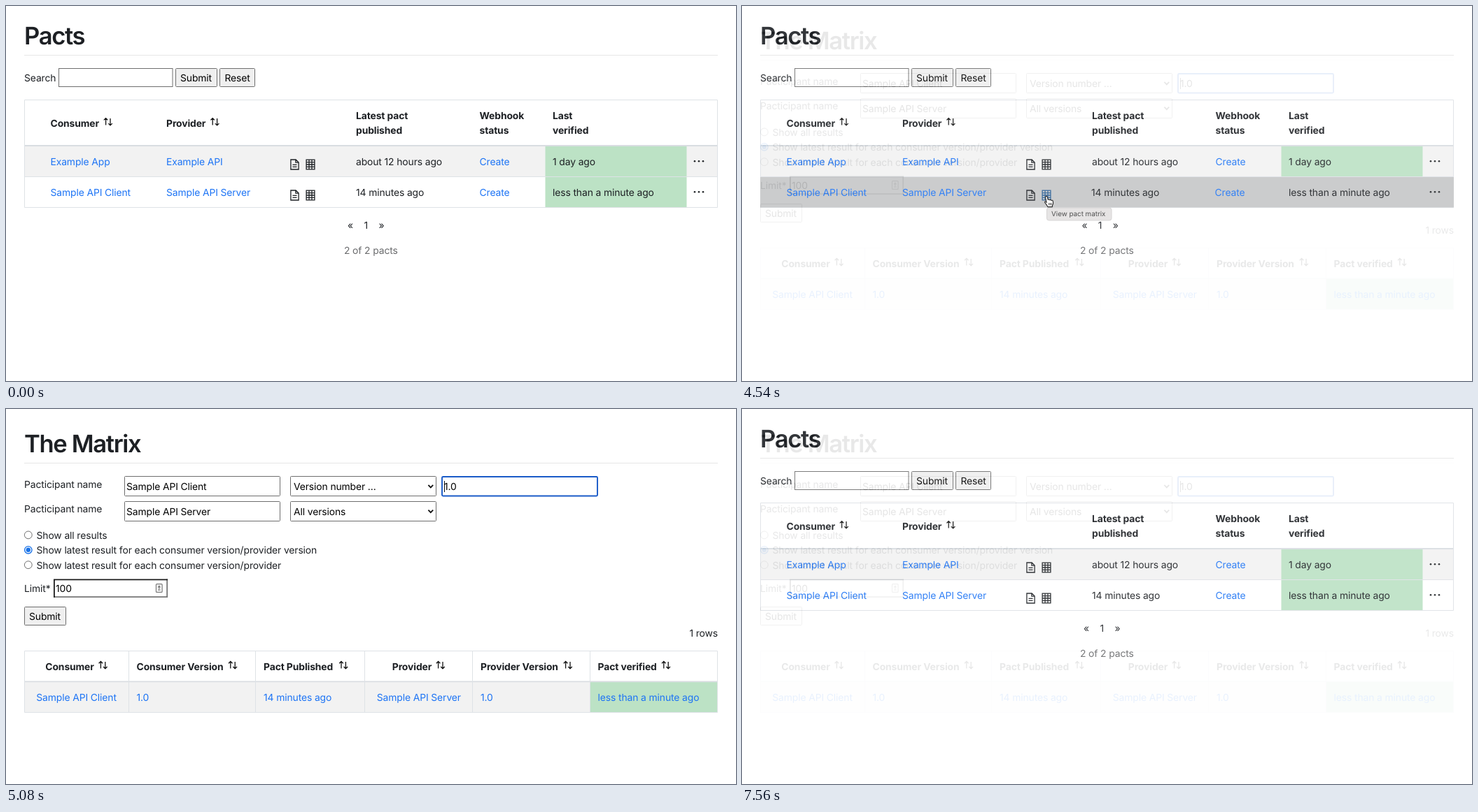
An HTML page that plays this animation: 1043 px wide and 537 px high, repeating every 7620 ms.

```html
<!DOCTYPE html>
<html lang="en">
<head>
<meta charset="utf-8">
<title>Pacts</title>
<style>
  html, body { margin: 0; width: 100%; height: 100%; overflow: hidden; background: #fff; }
  svg { display: block; width: 100vw; height: 100vh; }
  text {
    font: 400 13.9px Inter, "Liberation Sans", sans-serif;
    letter-spacing: -.12px;
    fill: #1d2024;
    text-rendering: geometricPrecision;
    white-space: pre;
  }
  .title { font-size: 34.6px; font-weight: 600; letter-spacing: -1.35px; }
  .th text { font-weight: 700; }
  .mid { text-anchor: middle; }
  .end { text-anchor: end; }
  .muted { fill: #6a6b6d; }
  .ctl text { fill: #000; }
  .link, .link text { fill: #1d74f5; }
  .tip { font-size: 9.8px; letter-spacing: 0; fill: #3c3c3c; }
  .line { fill: none; stroke: #dee2e6; }
  .rule { stroke: #e6e6e6; }
  .thick { stroke: #d9dde1; stroke-width: 1.8; }
  .box { fill: #fff; stroke: #6e6e6e; }
  .btn { fill: #efefef; stroke: #6e6e6e; }
  .ok { fill: #bce2c5; }
  .stripe { fill: #f2f2f2; }
  .ink { fill: none; stroke: #1d2024; stroke-width: 1.3; }
  .hot { stroke: #2a5f95; }

  /* cross-fades: ten hard steps of 60 ms */
  .hover, .matrix { opacity: 0; animation: 7620ms -8ms infinite; }
  .hover { animation-name: hover; }
  .matrix { animation-name: matrix; }
  @keyframes hover {
    0% { opacity: 0; animation-timing-function: step-end; }
    26.2467% { opacity: 0; animation-timing-function: steps(10, start); }
    34.1207% { opacity: 1; animation-timing-function: step-end; }
    70% { opacity: 0; animation-timing-function: step-end; }
    100% { opacity: 0; }
  }
  @keyframes matrix {
    0% { opacity: 0; animation-timing-function: step-end; }
    59.5801% { opacity: 0; animation-timing-function: steps(10, start); }
    67.4541% { opacity: 1; animation-timing-function: step-end; }
    92.9134% { opacity: 1; animation-timing-function: steps(9, start); }
    100% { opacity: .1; }
  }
</style>
</head>
<body>
<svg viewBox="0 0 1043 537" xmlns="http://www.w3.org/2000/svg">
  <defs>
    <path id="sort" fill="none" stroke="#111" stroke-width="1.3"
      d="M-3.2 5V-5M-6-2.2L-3.2-5L-.4-2.2M3.2-4.5V5.3M.4 2.5L3.2 5.3L6 2.5"/>
    <path id="file" class="ink"
      d="M-5.6-7H1.6L5.6-3V7H-5.6ZM1.4-7V-2.8H5.6M-3 .4H3M-3 3.4H3"/>
    <path id="grid"
      d="M-5.9-6.9H5.9V6.9H-5.9ZM-2-6.9V6.9M2-6.9V6.9M-5.9-3.4H5.9M-5.9 0H5.9M-5.9 3.4H5.9"/>
    <g id="dots" fill="#1d2024">
      <circle cx="-6" r="1.3"/><circle r="1.3"/><circle cx="6" r="1.3"/>
    </g>
    <path id="chevron" fill="none" stroke="#111" stroke-width="1.8" d="M-3.4-1.8L0 1.8L3.4-1.8"/>
    <circle id="radio" class="box" r="5.4"/>
  </defs>

  <g class="pacts">
    <rect width="1043" height="537" fill="#fff"/>
    <text class="title" x="26" y="55">Pacts</text>
    <path class="rule" d="M26 70.5H1017"/>
    <text x="26" y="108">Search</text>
    <g class="ctl">
      <rect class="box" x="75.5" y="89.5" width="162.5" height="26"/>
      <rect class="btn" x="242.5" y="89.5" width="59" height="26" rx="1"/>
      <text x="249" y="108">Submit</text>
      <rect class="btn" x="305.5" y="89.5" width="50" height="26" rx="1"/>
      <text x="312.5" y="108">Reset</text>
    </g>

    <rect class="stripe" x="26.5" y="200" width="990" height="44.5"/>
    <rect class="ok" x="770.5" y="200.5" width="202" height="88"/>
    <path class="line thick" d="M26.5 200H1016.5"/>
    <path class="line" d="M26.5 244.5H1016.5M26.5 134.5H1016.5V288.5H26.5Z"/>

    <g class="th">
      <text x="63.5" y="172.5">Consumer</text>
      <text x="229" y="172.5">Provider</text>
      <text x="500" y="161.8">Latest pact</text>
      <text x="500" y="183.2">published</text>
      <text x="676.5" y="161.8">Webhook</text>
      <text x="676.5" y="183.2">status</text>
      <text x="781" y="161.8">Last</text>
      <text x="781" y="183.2">verified</text>
    </g>
    <use href="#sort" x="145.8" y="165.6"/>
    <use href="#sort" x="298.4" y="165.6"/>

    <g class="link">
      <text x="63.5" y="228">Example App</text>
      <text x="229" y="228">Example API</text>
      <text x="676.5" y="228">Create</text>
      <text x="63.5" y="271.7">Sample API Client</text>
      <text x="229" y="271.7">Sample API Server</text>
      <text x="676.5" y="271.7">Create</text>
    </g>
    <text x="500" y="228">about 12 hours ago</text>
    <text x="781" y="228">1 day ago</text>
    <text x="500" y="271.7">14 minutes ago</text>
    <text x="781" y="271.7">less than a minute ago</text>
    <use href="#file" x="412.5" y="227"/>
    <use href="#grid" class="ink" x="435" y="227"/>
    <use href="#dots" x="990" y="222.3"/>
    <use href="#file" x="412.5" y="271"/>
    <use href="#grid" class="ink" x="435" y="271"/>
    <use href="#dots" x="990" y="266.2"/>

    <g class="mid">
      <text x="492" y="319">«</text>
      <text x="514.3" y="319">1</text>
      <text x="536.5" y="319">»</text>
      <text class="muted" x="521.3" y="354.6">2 of 2 pacts</text>
    </g>
  </g>

  <g class="hover">
    <rect x="480" y="300" width="66" height="28" fill="#fff"/>
    <rect x="26" y="245" width="991" height="43.5" fill="#c6c7c8"/>
    <g class="link">
      <text x="63.5" y="271.7">Sample API Client</text>
      <text x="229" y="271.7">Sample API Server</text>
      <text x="675.5" y="271.7">Create</text>
    </g>
    <text x="499" y="271.7">14 minutes ago</text>
    <text x="781" y="271.7">less than a minute ago</text>
    <use href="#file" x="412.5" y="271"/>
    <use href="#grid" class="ink hot" x="435" y="271"/>
    <use href="#dots" x="990" y="266.2"/>
    <g class="mid">
      <text x="489.4" y="319">«</text>
      <text x="511.6" y="319">1</text>
      <text x="533.8" y="319">»</text>
    </g>
    <rect x="435.5" y="289" width="92.5" height="18" rx="3" fill="#e4e2e2" stroke="#d2d0d0"/>
    <text class="tip" x="442" y="301.3">View pact matrix</text>
    <path fill="#fff" stroke="#111" stroke-width="1.1" stroke-linejoin="round"
      d="M435.2 281.5L433.6 274.6Q433.4 272.6 434.8 272.4Q436 272.2 436.4 274L437.2 277.4
         Q438.6 276.4 439.6 277.8Q441 276.8 442 278.4Q443.8 277.8 444.2 279.4L444.6 282
         Q444.7 284 443.4 285.6V287.6H436.8Q436 285.4 433.4 282.4Q432 280.6 433 280Q434 279.6 435.2 281.5Z"/>
    <path fill="none" stroke="#111" stroke-width=".8" d="M438.6 282V285.4M440.4 282V285.4M442.2 282V285.4"/>
  </g>

  <g class="matrix">
    <rect width="1043" height="537" fill="#fff"/>
    <text class="title" x="26" y="62">The Matrix</text>
    <path class="rule" d="M26 77.5H1017"/>
    <text x="26" y="112.5">Pacticipant name</text>
    <text x="26" y="148.3">Pacticipant name</text>

    <g class="ctl">
      <rect class="box" x="169.5" y="96.5" width="222" height="28" rx="1"/>
      <text x="172" y="116">Sample API Client</text>
      <rect class="box" x="169.5" y="132.5" width="222" height="28" rx="1"/>
      <text x="172" y="151.8">Sample API Server</text>
      <rect class="box" x="406.5" y="96.5" width="208" height="28" rx="1"/>
      <text x="411" y="116">Version number ...</text>
      <use href="#chevron" x="606.8" y="110.6"/>
      <rect class="box" x="406.5" y="132.5" width="208" height="28" rx="1"/>
      <text x="411" y="151.8">All versions</text>
      <use href="#chevron" x="606.8" y="146.4"/>
      <rect x="623" y="97" width="222" height="27.5" rx="1.5" fill="#fff" stroke="#1a5bc8" stroke-width="1.9"/>
      <text x="626" y="116">1.0</text>
      <path stroke="#111" d="M626.5 103V119"/>
    </g>

    <use href="#radio" x="31.8" y="180.4"/>
    <circle cx="31.8" cy="201.8" r="5.2" fill="#fff" stroke="#1a73e8" stroke-width="1.4"/>
    <circle cx="31.8" cy="201.8" r="3.2" fill="#1a73e8"/>
    <use href="#radio" x="31.8" y="223.2"/>
    <text x="43.5" y="185.6">Show all results</text>
    <text x="43.5" y="207">Show latest result for each consumer version/provider version</text>
    <text x="43.5" y="228.5">Show latest result for each consumer version/provider</text>

    <text x="26" y="261.8">Limit*</text>
    <path fill="none" stroke="#767676" stroke-width="1.8" d="M68 269.2H230.2V243.5"/>
    <path fill="none" stroke="#1c1c1c" stroke-width="1.8" d="M68.9 270V244.3H231"/>
    <g fill="none" stroke="#777" stroke-width="1.2">
      <rect x="214.5" y="250.6" width="8.6" height="11.8" rx="1"/>
      <path fill="#777" d="M218.8 253.2L220 254.8H217.6ZM217 259.2H220.6M218.8 255V258"/>
    </g>
    <g class="ctl">
      <text x="71" y="261.8">100</text>
      <rect class="btn" x="26.5" y="283.5" width="59" height="26" rx="1"/>
      <text x="33" y="302">Submit</text>
    </g>
    <text class="end" x="1017" y="326">1 rows</text>

    <rect class="stripe" x="26.5" y="390.5" width="990" height="44"/>
    <rect class="ok" x="834.5" y="390.5" width="182" height="44"/>
    <path class="line thick" d="M26.5 390.3H1016.5"/>
    <path class="line" d="M26.5 346.5H1016.5V434.5H26.5ZM175.5 346.5V434.5M356.5 346.5V434.5M512.5 346.5V434.5M666.5 346.5V434.5M834.5 346.5V434.5"/>
    <g class="th">
      <text x="56.3" y="373.5">Consumer</text>
      <text x="186.5" y="373.5">Consumer Version</text>
      <text x="368" y="373.5">Pact Published</text>
      <text x="551.8" y="373.5">Provider</text>
      <text x="678" y="373.5">Provider Version</text>
      <text x="845.6" y="373.5">Pact verified</text>
    </g>
    <use href="#sort" x="138.6" y="366.5"/>
    <use href="#sort" x="324" y="366.5"/>
    <use href="#sort" x="482.2" y="366.5"/>
    <use href="#sort" x="620.8" y="366.5"/>
    <use href="#sort" x="802.8" y="366.5"/>
    <use href="#sort" x="943" y="366.5"/>
    <g class="link">
      <text x="43.3" y="418">Sample API Client</text>
      <text x="186.5" y="418">1.0</text>
      <text x="368" y="418">14 minutes ago</text>
      <text x="529.8" y="418">Sample API Server</text>
      <text x="678" y="418">1.0</text>
      <text x="845.6" y="418">less than a minute ago</text>
    </g>
  </g>
</svg>
</body>
</html>
```
